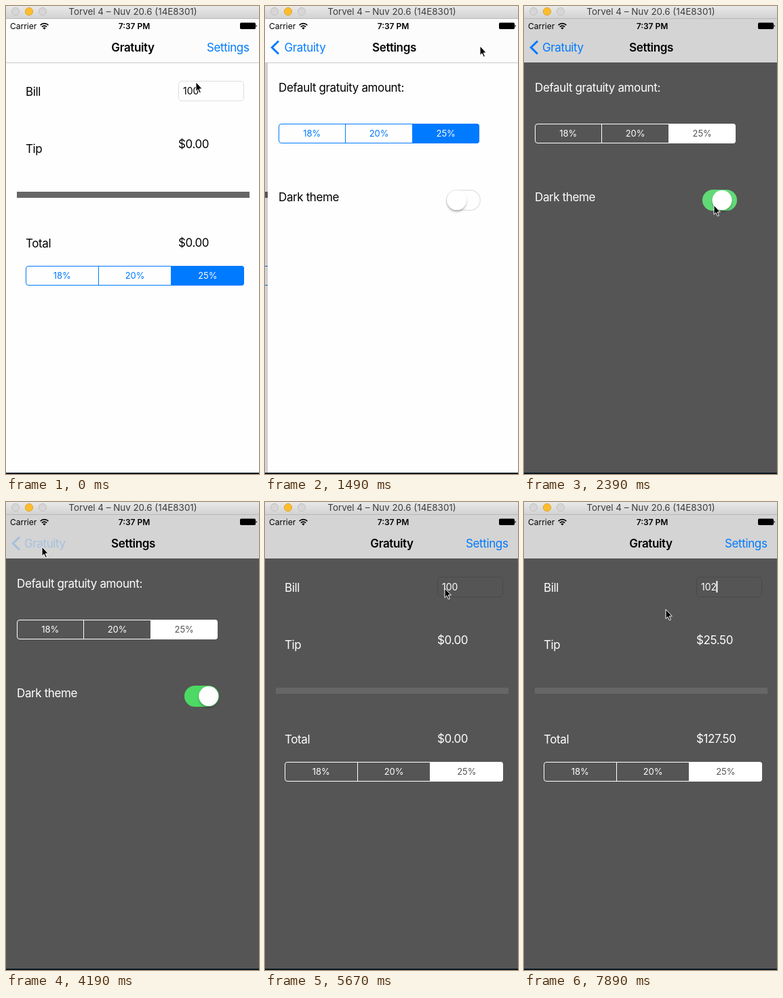
An HTML page for the animation above (8000 ms loop, 373 px wide and 688 px high).

```html
<!DOCTYPE html>
<html lang="en">
<head>
<meta charset="utf-8">
<title>Gratuity</title>
<style>
  html, body { margin: 0; width: 100%; height: 100%; overflow: hidden; }
  svg {
    display: block; width: 373px; height: 688px;
    font: 17px Inter, Roboto, sans-serif; letter-spacing: -.38px;
    --page: #fefefe; --ink: #000; --accent: #007aff; --nav: #fcfcfc;
    --line: #c9c9c9; --field: #dedede;
  }
  svg.dark {
    --page: #555; --ink: #fff; --accent: #fff; --nav: #d4d4d4;
    --line: #555; --field: #4a4a4a;
  }
  text { white-space: pre; }
  .page { fill: var(--page); }
  .ink { fill: var(--ink); }
  .seg { font-size: 13px; letter-spacing: -.05px; text-anchor: middle; fill: var(--accent); }
  .seg.on { fill: var(--page); }
  .frame { fill: none; stroke: var(--accent); }
  .chosen { fill: var(--accent); }
  .title { font-weight: 600; text-anchor: middle; }
  .link { fill: #007aff; }
  .small { font-size: 12px; letter-spacing: 0; }
  .entry { font-size: 14px; letter-spacing: 0; }
  .window { font-size: 13.4px; letter-spacing: 0; text-anchor: middle; fill: #3c3c3c; }
</style>
</head>
<body>
<svg id="stage" viewBox="0 0 373 688">
  <defs>
    <linearGradient id="chrome" x2="0" y2="1">
      <stop stop-color="#e9e9e9"/><stop offset="1" stop-color="#d1d1d1"/>
    </linearGradient>
    <linearGradient id="edge">
      <stop stop-opacity="0"/><stop offset="1" stop-opacity=".12"/>
    </linearGradient>
    <filter id="lift" x="-40%" y="-40%" width="180%" height="190%">
      <feDropShadow dx="0" dy="2.5" stdDeviation="1.6" flood-opacity=".28"/>
    </filter>
  </defs>

  <g id="home">
    <rect class="page" y="19" width="373" height="669"/>
    <text class="ink" x="29" y="131.5">Bill</text>
    <rect x="254.5" y="110.5" width="96" height="29" rx="4.5" fill="none" stroke="var(--field)"/>
    <text class="ink entry" id="bill" x="261" y="130"></text>
    <rect class="ink" id="caret" y="116" width="2" height="17"/>
    <text class="ink" x="29" y="215.5">Tip</text>
    <text class="ink" id="tip" x="254" y="209"></text>
    <rect x="16" y="273" width="343" height="9" fill="#666"/>
    <text class="ink" x="29" y="354.5">Total</text>
    <text class="ink" id="total" x="254" y="354"></text>
    <g id="homeRates"></g>
  </g>

  <rect id="dim" y="84" width="373" height="602"/>
  <g id="settings">
    <rect id="shadow" x="-8" y="84" width="8" height="602" fill="url(#edge)"/>
    <rect class="page" y="19" width="373" height="669"/>
    <text class="ink" x="16" y="125.5">Default gratuity amount:</text>
    <g id="settingsRates"></g>
    <text class="ink" x="16" y="287">Dark theme</text>
    <rect id="track" x="263.7" y="270.7" width="49.6" height="29.6" rx="14.8" stroke-width="1.5"/>
    <circle id="thumb" cy="285.5" r="14.4" fill="#fff" filter="url(#lift)"/>
  </g>

  <rect y="19" width="373" height="64" fill="var(--nav)"/>
  <rect y="83" width="373" height="1" fill="var(--line)"/>
  <text class="title" id="homeTitle" y="67">Gratuity</text>
  <text class="title" id="settingsTitle" y="67">Settings</text>
  <text class="link" id="open" x="358.5" y="67" text-anchor="end">Settings</text>
  <g id="back">
    <path d="M20 51.5L10.3 61L20 70.5" fill="none" stroke="#007aff" stroke-width="3"/>
    <text class="link" id="backLabel" y="67">Gratuity</text>
  </g>

  <text class="small" x="6" y="34">Carrier</text>
  <g fill="none" stroke="#000" stroke-width="1.7">
    <path d="M50.6 28.2a8 8 0 0 1 11.8 0M52.9 30.6a5 5 0 0 1 7.2 0"/>
  </g>
  <path d="M56.5 34.6L54.3 32.2a3.2 3.2 0 0 1 4.4 0Z"/>
  <text class="small title" x="189" y="34">7:37 PM</text>
  <rect x="345" y="24.5" width="23" height="9.5" rx="1.8"/>
  <path d="M368.6 27.6a1.8 1.8 0 0 1 0 3.4Z"/>

  <rect width="373" height="19" fill="url(#chrome)"/>
  <rect y="18" width="373" height="1" fill="#b9b9b9"/>
  <g fill="#d6d6d6" stroke="#c2c2c2">
    <circle cx="14" cy="8" r="5.6"/>
    <circle cx="34" cy="8" r="5.6" fill="#fdbd2f" stroke="#e2a325"/>
    <circle cx="54" cy="8" r="5.6"/>
  </g>
  <text class="window" x="187" y="13">Torvel 4 – Nuv 20.6 (14E8301)</text>
  <rect y="686" width="373" height="2" fill="#08171f"/>

  <path id="cursor" d="M1 .8V14.6L4 11.7L6.3 16.9L8.4 16L6.2 10.9H10.3Z" stroke="#fff"/>
</svg>

<script>
const LOOP = 8000, TICK = 148.8;
const $ = id => document.getElementById(id);
const set = (id, attrs) => {
  for (const name in attrs) $(id).setAttribute(name, attrs[name]);
};

// Pointer stops: tick, x, y
const stops = [
  [0, 279, 111], [2, 320, 53], [3, 320, 53], [4, 316, 58], [11, 316, 58],
  [15, 279, 292], [21, 279, 292], [26, 52, 65], [34, 52, 65],
  [38, 264, 126], [40, 273, 125], [52, 273, 125], [53, 208, 157]
];

function pointer(tick) {
  const next = stops.findIndex(stop => stop[0] > tick);
  if (next < 0) return stops[stops.length - 1].slice(1);
  const [t0, x0, y0] = stops[next - 1], [t1, x1, y1] = stops[next];
  const u = (tick - t0) / (t1 - t0), k = u * u * (3 - 2 * u);
  return [x0 + (x1 - x0) * k, y0 + (y1 - y0) * k];
}

function spring(ticks) {
  const u = 2.35 * Math.max(0, ticks);
  const value = 1 - (1 + u) * Math.exp(-u);
  return value > .997 ? 1 : value;
}

function rates(x, y, width) {
  const w = width / 3;
  const labels = ["18%", "20%", "25%"].map((label, i) =>
    `<text class="seg${i === 2 ? " on" : ""}" x="${x + w * (i + .5)}" y="${y + 19}">${label}</text>`);
  const [a, b] = [1, 2].map(i => Math.floor(x + w * i) + .5);
  return `<path class="chosen" d="M${b} ${y}H${x + width - 4}q4 0 4 4v21q0 4 -4 4H${b}Z"/>
    <rect class="frame" x="${x + .5}" y="${y + .5}" width="${width - 1}" height="28" rx="3.5"/>
    <path class="frame" d="M${a} ${y}v29M${b} ${y}v29"/>${labels.join("")}`;
}

function render(tick) {
  const dark = tick >= 16;
  $("stage").classList.toggle("dark", dark);

  const p = spring(tick - 7.264) - spring(tick - 28.264);
  set("home", { transform: `translate(${Math.round(-112 * p)})` });
  set("settings", { transform: `translate(${Math.floor(373 * (1 - p))})` });
  set("dim", { opacity: dark ? 0 : .1 * p });
  set("shadow", { opacity: dark || p === 1 || p === 0 ? 0 : 1 });

  set("homeTitle", { x: 187 - 112 * p, opacity: Math.max(0, 1 - 1.4 * p) });
  set("settingsTitle", { x: 187.5 + 247 * (1 - p), opacity: p });
  set("open", { opacity: tick === 7 ? .2 : Math.max(0, 1 - 1.65 * p) });
  set("back", { opacity: tick === 28 ? .22 : Math.max(0, 2.2 * p - 1.2) });
  set("backLabel", { x: 27 + 128 * (1 - p) });

  const green = tick === 16 ? "#62d977" : "#4cd964";
  set("track", dark ? { fill: green, stroke: green } : { fill: "#fefefe", stroke: "#e4e4e4" });
  set("thumb", { cx: !dark ? 278.5 : tick === 16 ? 292 : 298.7 });

  const bill = tick < 47 ? "100" : tick < 49 ? "10" : "102";
  const tip = tick < 47 ? 0 : bill * .25;
  $("bill").textContent = bill;
  $("tip").textContent = "$" + tip.toFixed(2);
  $("total").textContent = "$" + (tip && +bill + tip).toFixed(2);
  set("caret", { x: 259.4 + 8 * bill.length, opacity: tick >= 43 ? 1 : 0 });

  set("cursor", { transform: `translate(${pointer(tick).map(Math.round)})` });
}

$("homeRates").innerHTML = rates(29, 382, 322);
$("settingsRates").innerHTML = rates(16, 173, 296);

const start = performance.now();
let shown = -1;
function frame() {
  const tick = Math.floor((performance.now() - start) % LOOP / TICK);
  if (tick !== shown) render(shown = tick);
  requestAnimationFrame(frame);
}
frame();
</script>
</body>
</html>
```
